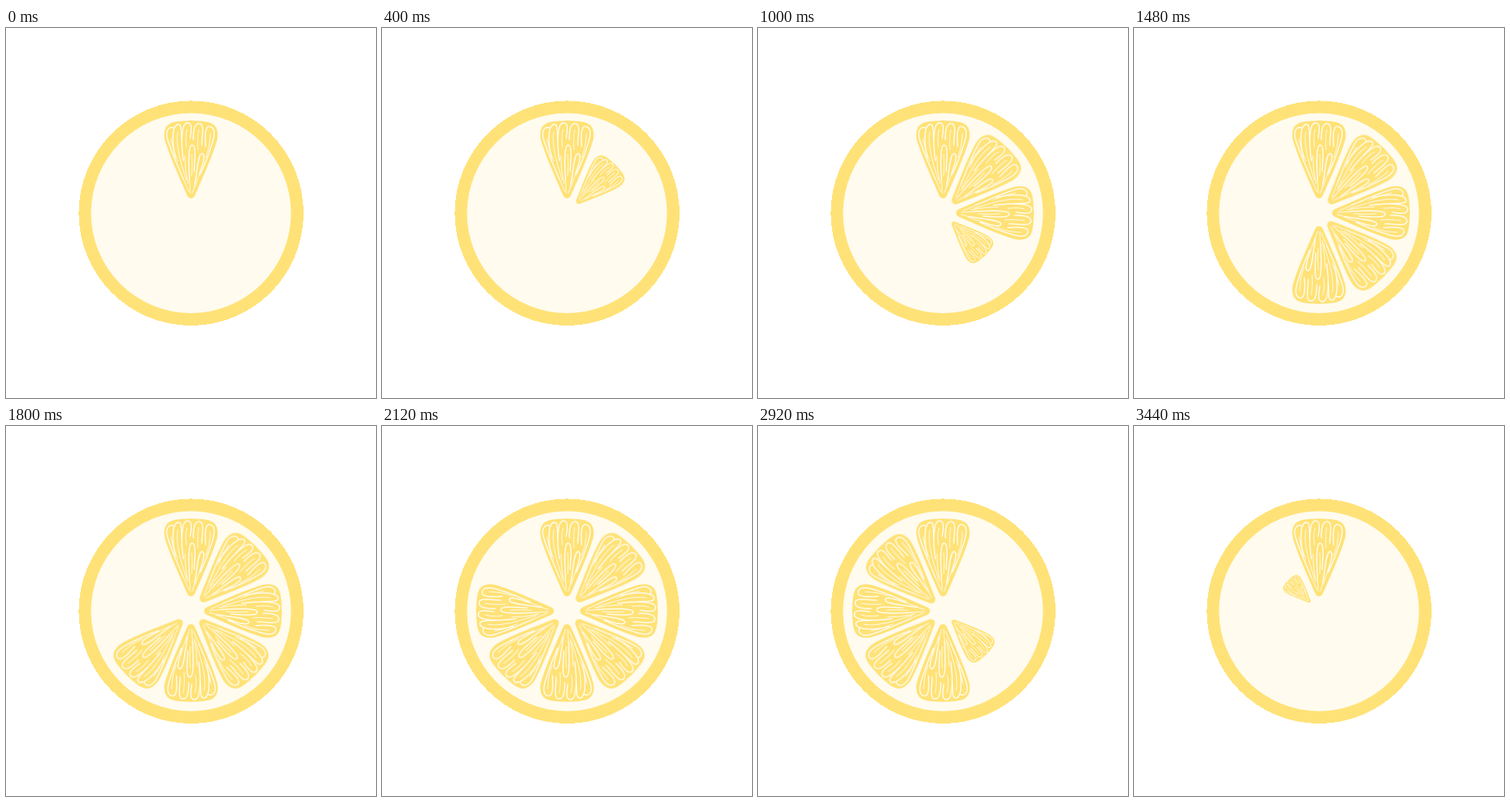
Write an HTML page without scripts that moves like this. It is 480 by 480 pixels and loops after 3.48 s.

```html
<!DOCTYPE html>
<html lang="en">
<head>
<meta charset="utf-8">
<title>Lemon loader</title>
<style>
html, body { margin: 0; width: 100%; height: 100%; overflow: hidden; background: #fff; }
svg { display: block; width: 100%; height: 100%; }
.rind { fill: #ffe277; shape-rendering: crispEdges; }
.pith { fill: #fffbee; }
.flesh { fill: #ffe277; }
.veins { fill: none; stroke: #fffbee; stroke-width: 1.5; stroke-linecap: round; stroke-linejoin: round; }
.fine { stroke-width: 1; }

/* The small negative delay keeps each 40 ms step clear of its boundary. */
.grow { animation: 3480ms step-end -4ms infinite; transform: scale(0); }
.a { animation-name: a; }
.b { animation-name: b; }
.c { animation-name: c; }
.d { animation-name: d; }
.e { animation-name: e; }
.f { animation-name: f; }
.g { animation-name: g; }

@keyframes a {
  0% { transform: scale(0); }
  6.897% { transform: scale(.2); animation-timing-function: steps(8, start); }
  16.092% { transform: scale(1); }
  77.011% { transform: scale(.62); }
  78.161% { transform: scale(.4); }
  79.31%, 100% { transform: scale(0); }
}
@keyframes b {
  0% { transform: scale(0); }
  16.092% { transform: scale(.2); animation-timing-function: steps(8, start); }
  25.287% { transform: scale(1); }
  80.46% { transform: scale(.62); }
  81.609% { transform: scale(.4); }
  82.759%, 100% { transform: scale(0); }
}
@keyframes c {
  0% { transform: scale(0); }
  25.287% { transform: scale(.2); animation-timing-function: steps(8, start); }
  34.483% { transform: scale(1); }
  83.908% { transform: scale(.62); }
  85.057% { transform: scale(.4); }
  86.207%, 100% { transform: scale(0); }
}
@keyframes d {
  0% { transform: scale(0); }
  34.483% { transform: scale(.2); animation-timing-function: steps(8, start); }
  43.678% { transform: scale(1); }
  87.356% { transform: scale(.62); }
  88.506% { transform: scale(.4); }
  89.655%, 100% { transform: scale(0); }
}
@keyframes e {
  0% { transform: scale(0); }
  43.678% { transform: scale(.2); animation-timing-function: steps(8, start); }
  52.874% { transform: scale(1); }
  90.805% { transform: scale(.62); }
  91.954% { transform: scale(.4); }
  93.103%, 100% { transform: scale(0); }
}
@keyframes f {
  0% { transform: scale(0); }
  52.874% { transform: scale(.2); animation-timing-function: steps(8, start); }
  62.069% { transform: scale(1); }
  94.253% { transform: scale(.62); }
  95.402% { transform: scale(.4); }
  96.552%, 100% { transform: scale(0); }
}
@keyframes g {
  0% { transform: scale(0); }
  62.069% { transform: scale(.2); animation-timing-function: steps(8, start); }
  71.264% { transform: scale(1); }
  97.701% { transform: scale(.62); }
  98.851% { transform: scale(.4); }
  100% { transform: scale(0); }
}
</style>
</head>
<body>
<svg viewBox="0 0 480 480">
  <defs>
    <!-- One wedge, tip at 0,0, pointing up -->
    <g id="wedge" transform="translate(0 17)">
      <path class="flesh" d="M0-17C-3-17-5-20-6-23C-16-46-28-72-34-93C-36-103-34-112-25-115C-17-118-8-117 0-118C8-117 17-118 25-115C34-112 36-103 34-93C28-72 16-46 6-23C5-20 3-17 0-17Z"/>
      <g class="veins">
        <path d="M-10-42C-18-62-27-80-31-96C-33-106-28-111-22-108"/>
        <path d="M-20-70C-25-88-25-111-17-113C-11-114-13-102-12-92"/>
        <path d="M-10-66C-13-88-13-114-5-115C3-115 0-104-1-95"/>
        <path d="M3-93C3-104 4-115 11-114C18-113 14-98 14-86"/>
        <path d="M19-84C18-98 18-112 25-110C33-108 30-95 26-84C22-70 17-60 12-48"/>
        <path d="M-2-40C-3-60-4-85 1-86C7-87 5-68 4-52"/>
        <path d="M5-36C8-52 9-74 14-75C20-75 15-60 11-49"/>
      </g>
      <g class="veins fine">
        <path d="M-3-26Q-6-34-10-42"/>
        <path d="M-1-24Q-1-32-2-40"/>
        <path d="M2-24Q4-30 5-36"/>
        <path d="M11-49L5-32"/>
        <path d="M-6-40C-10-54-15-68-17-82Q-19-96-17-103"/>
        <path d="M-4-36Q-8-54-8-72"/>
        <path d="M-17-65Q-24-80-26-94"/>
        <path d="M-6-84Q-8-98-5-106"/>
        <path d="M1-46Q2-60 1-74"/>
        <path d="M9-80Q8-96 10-106"/>
        <path d="M19-70Q25-84 25-101"/>
      </g>
    </g>
  </defs>

  <circle class="rind" cx="240.2" cy="240.2" r="145.8"/>
  <circle class="pith" cx="240" cy="240.2" r="129.7"/>

  <g transform="translate(240 240)">
    <use href="#wedge" y="-19"/>
    <g transform="rotate(45) translate(0 -18)"><use class="grow a" href="#wedge"/></g>
    <g transform="rotate(90) translate(0 -17)"><use class="grow b" href="#wedge"/></g>
    <g transform="rotate(135) translate(0 -17)"><use class="grow c" href="#wedge"/></g>
    <g transform="rotate(180) translate(0 -17)"><use class="grow d" href="#wedge"/></g>
    <g transform="rotate(225) translate(0 -17)"><use class="grow e" href="#wedge"/></g>
    <g transform="rotate(270) translate(0 -17)"><use class="grow f" href="#wedge"/></g>
    <g transform="rotate(315) translate(0 -16)"><use class="grow g" href="#wedge"/></g>
  </g>
</svg>
</body>
</html>
```
